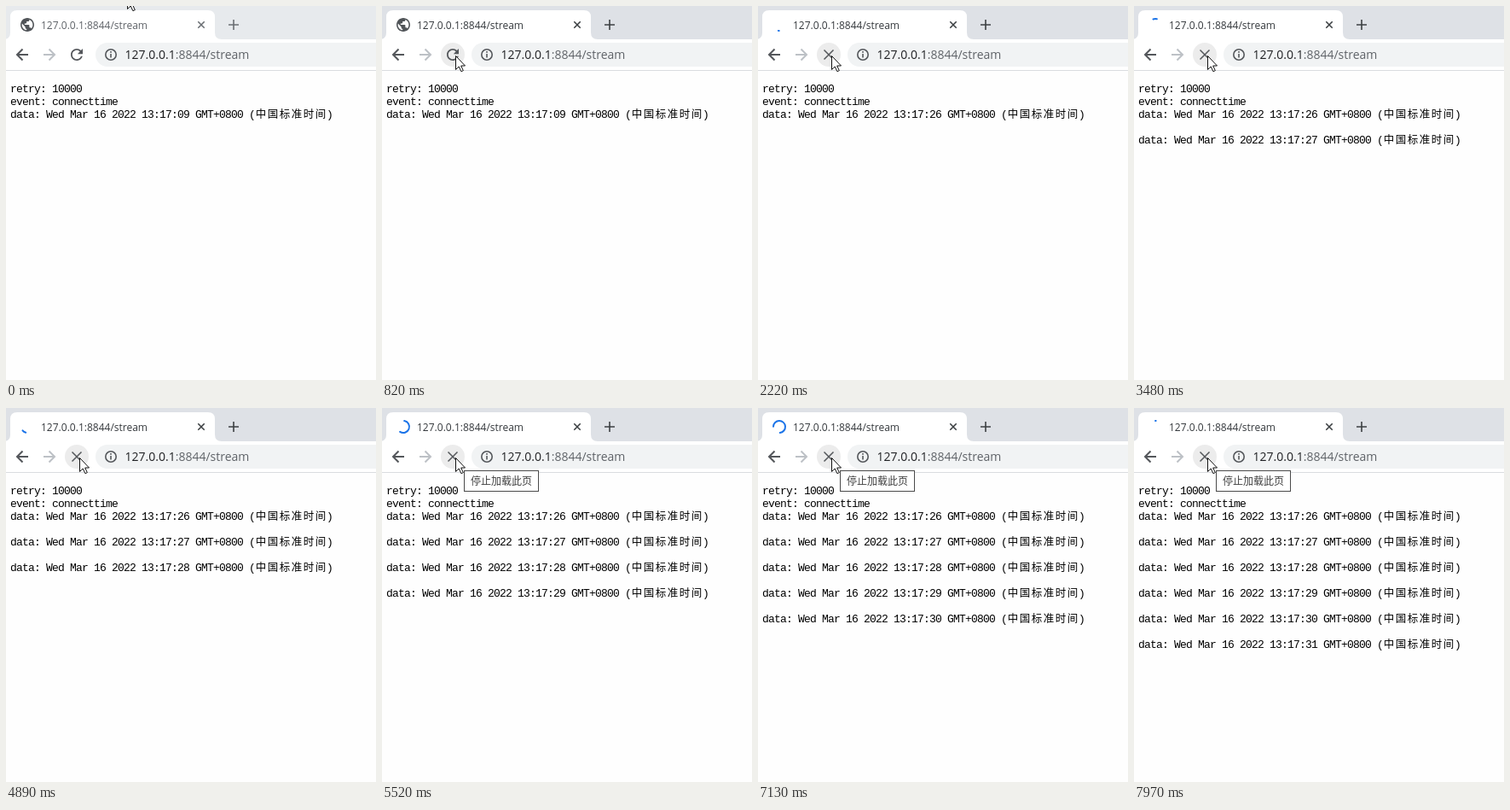
Animation, 434 px wide and 438 px high, one loop 8 s. Source, as an HTML page:

```html
<!DOCTYPE html>
<html lang="zh-CN">
<head>
<meta charset="utf-8">
<title>Event stream</title>
<style>
  html, body { margin: 0; width: 100%; height: 100%; overflow: hidden; background: #fefefe; }
  svg { display: block; width: 434px; height: 438px; }
  text { white-space: pre; }
  .ui { font-family: "Open Sans", "Noto Sans", sans-serif; }
  .log { font: 13px "Liberation Mono", monospace; letter-spacing: -.8px; fill: #000; }
  .han { font-family: "Noto Sans CJK SC", "Noto Sans CJK", sans-serif; }
  .log .han { font-size: 12.5px; letter-spacing: 1.5px; }
  .line { fill: none; stroke: #54575b; stroke-width: 2; }
</style>
</head>
<body>
<svg viewBox="0 0 434 438">
  <rect width="434" height="438" fill="#fefefe"/>
  <rect id="strip" width="434" height="39"/>
  <path d="M-3 39Q5 39 5 31V13Q5 5 13 5H237Q245 5 245 13V31Q245 39 253 39Z" fill="#fff"/>
  <rect y="39" width="434" height="36" fill="#fff"/>
  <rect y="75" width="434" height="1" fill="#dadce0"/>

  <path id="globe" fill="#505458" transform="translate(15.4 12.4) scale(.8)" d="M12 2C6.48 2 2 6.48 2 12s4.48 10 10 10 10-4.48 10-10S17.52 2 12 2zm-1 17.93c-3.95-.49-7-3.85-7-7.93 0-.62.08-1.21.21-1.79L9 15v1c0 1.1.9 2 2 2v1.93zm6.9-2.54c-.26-.81-1-1.39-1.9-1.39h-1v-3c0-.55-.45-1-1-1H8v-2h2c.55 0 1-.45 1-1V7h2c1.1 0 2-.9 2-2v-.41c2.93 1.19 5 4.06 5 7.41 0 2.08-.8 3.97-2.1 5.39z"/>
  <path id="spinner" fill="none" stroke-width="2" stroke-linecap="round"/>
  <text id="title" class="ui" x="41" y="27" font-size="12">127.0.0.1:8844/stream</text>
  <path id="tabIcons" fill="none" stroke-width="1.6" d="M225.3 18.3l7.4 7.4m0-7.4l-7.4 7.4M261 22h12m-6-6v12"/>

  <path class="line" d="M26 57H13.5M19.5 50.5L13 57L19.5 63.5"/>
  <path class="line" style="stroke:#bdc1c6" d="M44 57H56.5M50.5 50.5L57 57L50.5 63.5"/>
  <circle id="hover" cx="83" cy="57" r="14" fill="#ececec"/>
  <path id="reload" fill="#54575b" transform="translate(72.5 46.5) scale(.875)" d="M17.65 6.35C16.2 4.9 14.21 4 12 4c-4.42 0-7.99 3.58-7.99 8s3.57 8 7.99 8c3.73 0 6.84-2.55 7.73-6h-2.08c-.82 2.33-3.04 4-5.65 4-3.31 0-6-2.69-6-6s2.69-6 6-6c1.66 0 3.14.69 4.22 1.78L13 11h7V4l-2.35 2.35z"/>
  <path id="stop" class="line" style="stroke-width:1.5" d="M77.5 51.5l11 11m0-11l-11 11"/>

  <rect x="105" y="43" width="360" height="28" rx="14" fill="#f1f3f4"/>
  <circle class="line" style="stroke-width:1.6" cx="123" cy="57" r="6.2"/>
  <path class="line" style="stroke-width:1.6" d="M123 53v1.8M123 56v4.6"/>
  <text class="ui" x="139.5" y="62" font-size="14" fill="#202124">127.0.0.1<tspan fill="#5f6368">:8844/stream</tspan></text>

  <text class="log" x="5" y="101">retry: 10000</text>
  <text class="log" x="5" y="116">event: connecttime</text>
  <g id="rows"></g>

  <g id="tip">
    <rect x="96.5" y="73.5" width="87" height="24" fill="#fff" stroke="#4a4a4a"/>
    <text class="han" x="104" y="90" font-size="12" fill="#404040">停止加载此页</text>
  </g>
  <path id="cursor" fill="#fff" stroke="#111" stroke-width="1" d="M.5 .5V16.5L4.2 13L6.9 18.7L9.3 17.6L6.7 12H11.5Z"/>
</svg>
<script>
const LOOP = 8000, STEP = 70;
const PRESS = 820, LOAD = 960, CLEAR = 1030, TIP = 5500;
const FIRST = 2130, EVERY = 1058;         // data rows
const ARC = 700, TURN = 1646, MAX = 270;  // spinner
const $ = id => document.getElementById(id);
const show = (id, on) => $(id).style.display = on ? "" : "none";
const clamp = v => Math.max(0, Math.min(1, v));

// cubic-bezier(.4, 0, .2, 1)
function ease(x) {
  let lo = 0, hi = 1, s = .5;
  for (let i = 0; i < 20; i++) {
    s = (lo + hi) / 2;
    const bx = 1.2 * s * (1 - s) ** 2 + .6 * s * s * (1 - s) + s ** 3;
    if (bx < x) lo = s; else hi = s;
  }
  return 3 * s * s - 2 * s ** 3;
}

function arcPath(from, to) {
  const at = deg => {
    const a = deg * Math.PI / 180;
    return (25 + 7 * Math.cos(a)).toFixed(2) + " " + (22 + 7 * Math.sin(a)).toFixed(2);
  };
  return `M${at(from)}A7 7 0 ${to - from > 180 ? 1 : 0} 1 ${at(to)}`;
}

function drawSpinner(t) {
  const u = t - 270;
  const start = 123.5 + 360 * u / TURN + MAX * Math.floor(u / (2 * ARC));
  const grown = MAX * ease(u % ARC / ARC);
  const growing = Math.floor(u / ARC) % 2 === 1;
  const sweep = Math.max(5, growing ? grown : MAX - grown);
  $("spinner").setAttribute("d", growing ? arcPath(start, start + sweep) : arcPath(start - sweep, start));
  const k = clamp((t - LOAD) / 945);
  const mix = (a, b) => Math.round(a + (b - a) * k);
  $("spinner").setAttribute("stroke", `rgb(${mix(154, 26)},${mix(160, 115)},${mix(166, 232)})`);
}

function drawCursor(t) {
  const p = clamp(t / 490), e = 1 - (1 - p) ** 2;
  const x = 142 - 56 * e - 16 * Math.sin(Math.PI * p), y = -13 + 71 * e;
  $("cursor").setAttribute("transform", `translate(${Math.round(x)} ${Math.round(y)})`);
}

const row = (sec, y) => `<text class="log" x="5" y="${y}">data: Wed Mar 16 2022 13:17:${sec} GMT+0800 (` +
  `<tspan class="han" x="292.7">中国标准时间</tspan><tspan x="376">)</tspan></text>`;

let shown = "";
function drawRows(t) {
  let html = t < CLEAR ? row("09", 131) : "";
  for (let i = 0; i < 6 && t >= FIRST + i * EVERY; i++) html += row(26 + i, 131 + 30 * i);
  if (html !== shown) $("rows").innerHTML = shown = html;
}

function draw(now) {
  const base = now < PRESS ? 0 : PRESS;
  const t = base + Math.floor((now - base) / STEP) * STEP;
  const active = t >= PRESS, loading = t >= LOAD;
  $("strip").setAttribute("fill", active ? "#dee1e6" : "#e7eaed");
  $("title").setAttribute("fill", active ? "#35393d" : "#5f6368");
  $("tabIcons").setAttribute("stroke", active ? "#3c4043" : "#6b6f74");
  show("hover", active);
  show("globe", !loading);
  show("reload", !loading);
  show("spinner", loading);
  show("stop", loading);
  show("tip", t >= TIP);
  if (loading) drawSpinner(t);
  drawRows(t);
  drawCursor(t);
}

const began = performance.now();
function tick() {
  draw((performance.now() - began) % LOOP);
  requestAnimationFrame(tick);
}
tick();
</script>
</body>
</html>
```
